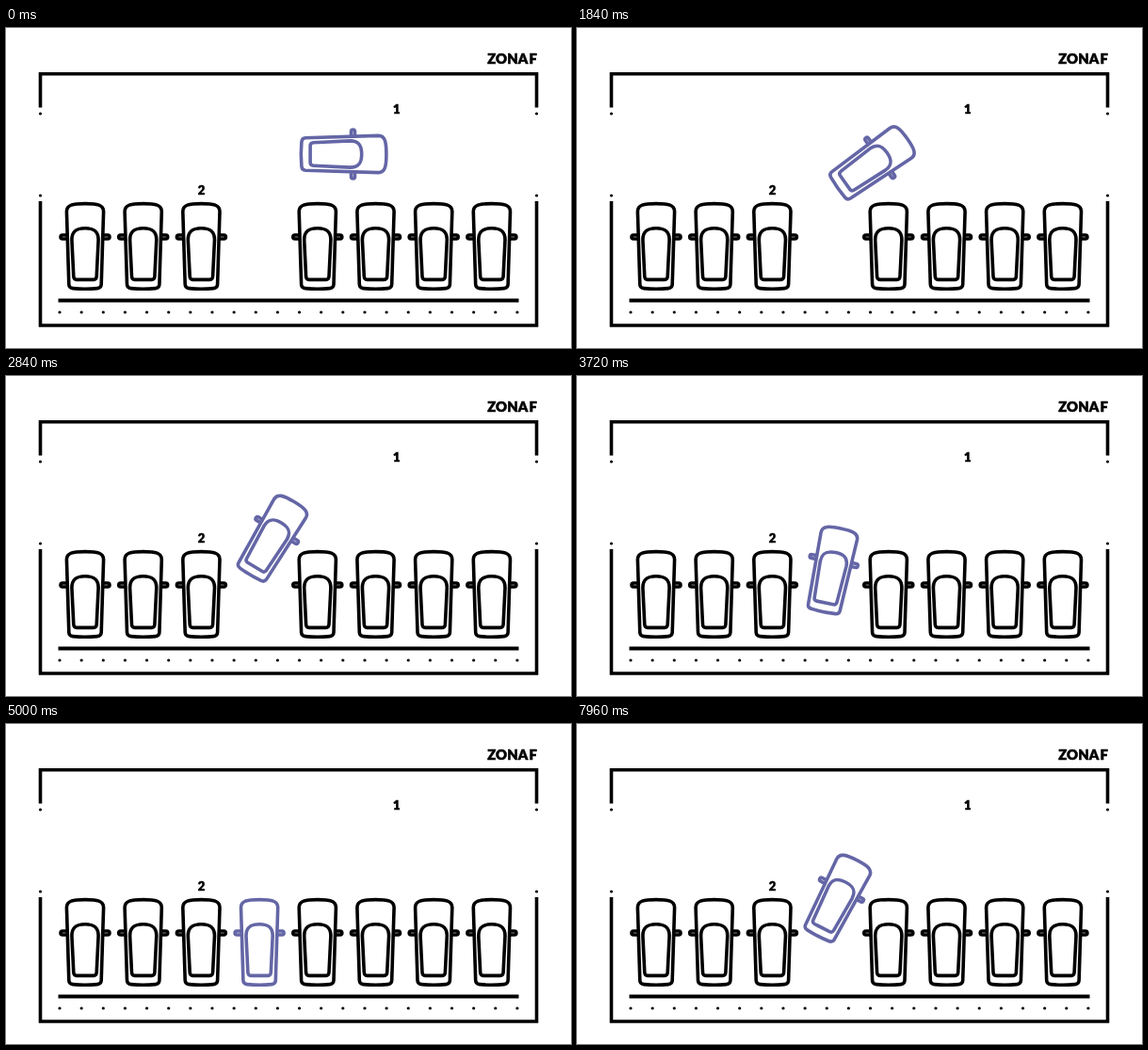
Write an HTML page that moves like this. It is 600 px wide and 340 px high and loops after 8000 ms.

```html
<!DOCTYPE html>
<html lang="en">
<head>
<meta charset="utf-8">
<title>Parking</title>
<style>
  html, body { margin: 0; width: 100%; height: 100%; overflow: hidden; background: #fff; }
  svg { display: block; width: 600px; height: 340px; }
  text { font: 900 13px Lato, sans-serif; stroke: #000; stroke-width: 0.5; text-anchor: middle; }
  #title { font-size: 14.8px; word-spacing: -1.5px; text-anchor: end; }
  .line { fill: none; stroke: #000; stroke-width: 3.6; }
  #car { stroke-linejoin: round; }
  #mover { stroke: #6466a6; }
</style>
</head>
<body>
<svg viewBox="0 0 600 340">
  <defs>
    <g id="car">
      <path d="M-19.6-37C-19.6-44-13-45.4 0-45.4S19.6-44 19.6-37L17.2 40.5Q17 44.2 13 44.6Q0 45.8-13 44.6Q-17 44.2-17.2 40.5Z"/>
      <path d="M-14.1-7C-14.1-16.5-9-19.2 0-19.2S14.1-16.5 14.1-7L12.2 32Q12 35.4 9 35.4H-9Q-12 35.4-12.2 32Z"/>
      <path d="M-19.5-12H-24a2 2 0 0 0 0 4h5M19.5-12H24a2 2 0 0 1 0 4h-5"/>
    </g>
  </defs>
  <path class="line" d="M36.5 84.4V48.8H563.5V84.4M36.5 184V316H563.5V184"/>
  <path class="line" d="M55.5 289.5H544.5" style="stroke-width:4"/>
  <g id="dots"></g>
  <g id="parked" class="line"></g>
  <use id="mover" class="line" href="#car"/>
  <text id="title" x="564" y="38.4">ZONA F</text>
  <text x="414.8" y="91.2">1</text>
  <text x="207.5" y="176.6">2</text>
</svg>
<script>
const LOOP = 8000, STEP = 40, FREE_SLOT = 3;
const byId = id => document.getElementById(id);

const dot = (x, y) => `<circle cx="${x}" cy="${y}" r="1.6"/>`;
let dots = '';
for (const x of [36.5, 563.5]) dots += dot(x, 91) + dot(x, 178);
for (let i = 0; i <= 21; i++) dots += dot(57 + i * 23.14, 302);
byId('dots').innerHTML = dots;

let cars = '';
for (let i = 0; i < 8; i++) {
  if (i !== FREE_SLOT) cars += `<use href="#car" x="${84 + i * 61.7}" y="232"/>`;
}
byId('parked').innerHTML = cars;

const ease = (t, start, length) => {
  const u = Math.min(1, Math.max(0, (t - start) / length));
  return (1 - Math.cos(Math.PI * u)) / 2;
};
const bezier = (s, a, b, c, d) => {
  const w = 1 - s;
  return w * w * w * a + 3 * w * w * s * b + 3 * w * s * s * c + s * s * s * d;
};

// Reverse into the free slot, wait, then pull out along the same curve.
function draw(now) {
  const t = Math.floor(now % LOOP / STEP) * STEP;
  const entry = ease(t, 40, 4960), exit = ease(t, 6980, 2650);
  const s = entry - exit, left = 1 - entry;
  const x = bezier(s, 358.5, 298.5, 267.5, 269.1);
  const y = bezier(s, 134, 134, 174, 232);
  // The car turns ahead of its travel on entry and evenly on exit.
  const turn = entry * (1 + 0.18 * left + 0.85 * left ** 4) - exit;
  byId('mover').setAttribute('transform', `translate(${x} ${y}) rotate(${90 * (1 - turn)})`);
}

const start = performance.now();
function tick() {
  draw(performance.now() - start);
  requestAnimationFrame(tick);
}
tick();
</script>
</body>
</html>
```
